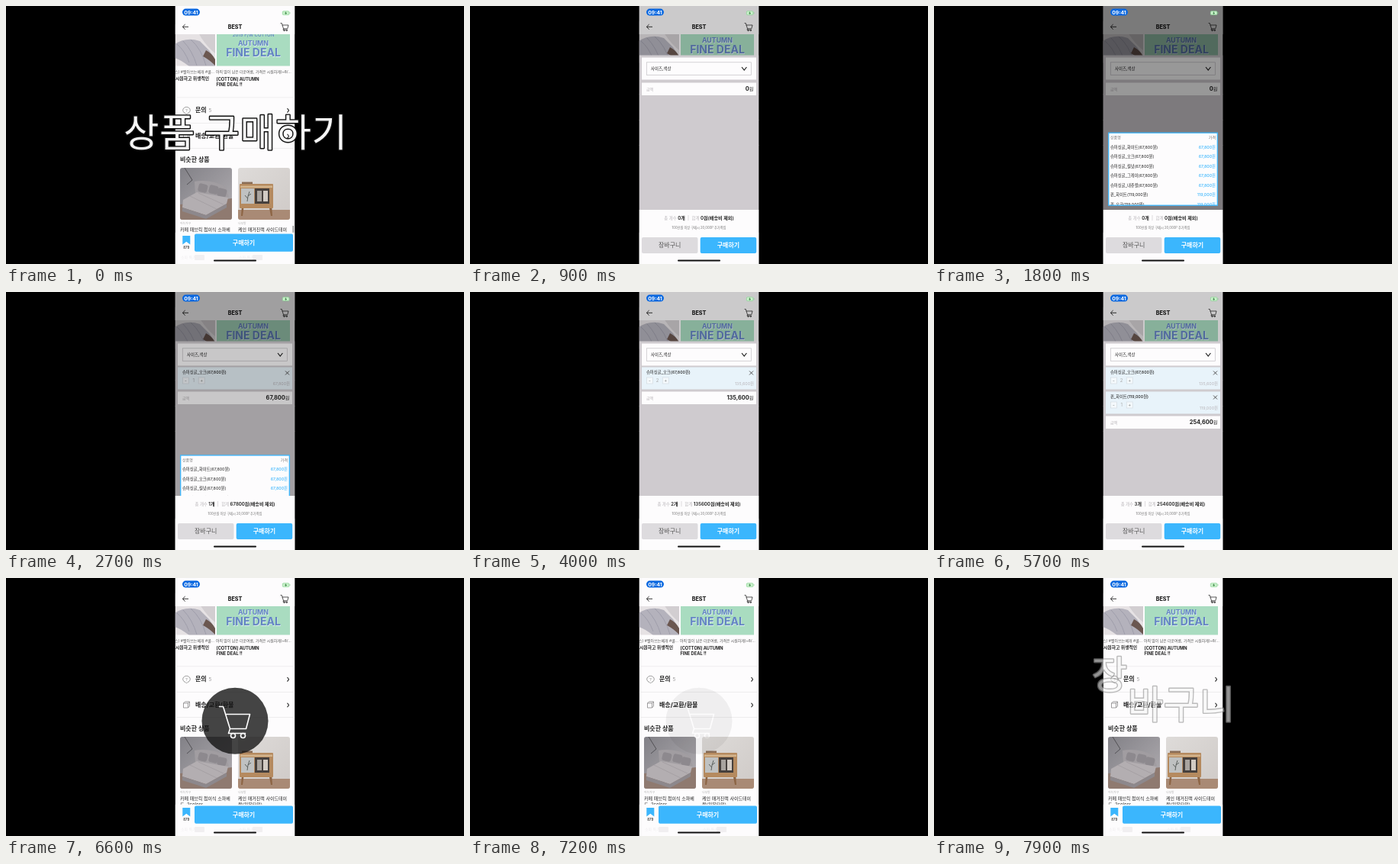
Write an HTML page that moves like this. It is 600 px wide and 338 px high and loops after 8000 ms.

```html
<!DOCTYPE html>
<html lang="ko">
<head>
<meta charset="utf-8">
<title>상품 구매하기</title>
<style>
html, body { margin: 0; width: 100%; height: 100%; overflow: hidden; background: #000; }
svg { display: block; width: 100vw; height: 100vh; }
text { font-family: Inter, "Noto Sans CJK KR", "Noto Sans CJK", "Noto Sans", sans-serif; white-space: pre; }
.title text { font-family: "Noto Sans CJK KR", "Noto Sans CJK", sans-serif; font-size: 50.5px; font-weight: 300; fill: #f6f6f6; stroke-width: 2.8; stroke-linejoin: round; paint-order: stroke; }
</style>
</head>
<body>
<svg id="stage" viewBox="0 0 600 338"></svg>
<script>
const LOOP = 8000, STEP = 100;
const LEFT = 221.6, WIDTH = 156.8;
const BLUE = '#3bb6fd', INK = '#222', PALE = '#b9b6ba', SHADE = '#cfcbcf', PAPER = '#fdfcfd';
const stage = document.getElementById('stage');

// Drawing helpers
const rect = (x, y, w, h, fill, extra = '') =>
  `<rect x="${x}" y="${y}" width="${w}" height="${h}" fill="${fill}" ${extra}/>`;
const band = (y, h, fill, extra) => rect(LEFT, y, WIDTH, h, fill, extra);
const path = (d, stroke, width = 1, extra = '') =>
  `<path d="${d}" fill="none" stroke="${stroke}" stroke-width="${width}" ${extra}/>`;
const shape = (d, fill) => `<path d="${d}" fill="${fill}"/>`;
const text = (x, y, size, str, fill = INK, weight = 400, anchor = 'start') =>
  `<text x="${x}" y="${y}" font-size="${size}" fill="${fill}" font-weight="${weight}" text-anchor="${anchor}">${str}</text>`;
const span = (str, size, fill, weight = 400) =>
  `<tspan font-size="${size}" fill="${fill}" font-weight="${weight}">${str}</tspan>`;
const group = (str, dx = 0, dy = 0, alpha = 1, extra = '', scale = 1) =>
  `<g transform="translate(${dx} ${dy}) scale(${scale})" opacity="${alpha}" ${extra}>${str}</g>`;

// Timing helpers
const ramp = (t, a, b) => {
  const p = Math.min(1, Math.max(0, (t - a) / (b - a)));
  return p * p * (3 - 2 * p);
};
const pulse = (t, a, b, c, d) => ramp(t, a, b) - ramp(t, c, d);
const comma = n => n.toLocaleString('en-US');

const defs = `<defs>
  <clipPath id="phone"><rect x="${LEFT}" width="${WIDTH}" height="338"/></clipPath>
  <clipPath id="pillow"><rect x="${LEFT}" y="20" width="52.4" height="54.5"/></clipPath>
  <clipPath id="card"><rect width="68" height="68" rx="3"/></clipPath>
  <clipPath id="list"><rect x="228" y="165" width="144" height="96"/></clipPath>
  <linearGradient id="wall" x2="1" y2="1"><stop stop-color="#828187"/><stop offset="1" stop-color="#b3afb3"/></linearGradient>
  <linearGradient id="room" x2="1" y2="1"><stop stop-color="#dedbd9"/><stop offset="1" stop-color="#cfcac7"/></linearGradient>
</defs>`;

const cart = (color, width) =>
  path('M0 0H5L14 29H35L40 10H8.5M14 29L12 35H34', color, width, 'stroke-linejoin="round" stroke-linecap="round"') +
  `<g fill="none" stroke="${color}" stroke-width="${width}"><circle cx="18" cy="38" r="3"/><circle cx="31" cy="38" r="3"/></g>`;

function pillowPhoto() {
  return group(
    rect(LEFT, 20, 53, 55, '#e6e2e4') +
    shape('M221 46Q236 36 254 42L266 54 274 66V75H240Q228 66 221 64Z', '#b4b2bc') +
    shape('M246 20H274V58Q264 50 256 38Z', '#d2ced1') +
    shape('M262 54Q270 58 274 66V74Q266 66 258 62Z', '#6b5750') +
    path('M232 42Q244 54 250 74M242 40Q256 52 262 74M224 46Q234 54 240 70', '#9c9ba9', 0.9),
    0, 0, 1, 'clip-path="url(#pillow)"');
}

function sofaPhoto() {
  const cushion = (x, y) => rect(x, y, 12, 11, '#8d898e', `rx="3" transform="rotate(14 ${x + 6} ${y + 5})"`);
  return group(
    rect(0, 0, 68, 68, 'url(#wall)') +
    shape('M0 48L68 40V68H0Z', '#8f7a70') +
    path('M6 0L16 16M16 16L9 22', '#454347', 0.8) +
    shape('M19 18Q40 14 60 25L64 38 56 46 20 34Z', '#a19da1') +
    cushion(24, 21) + cushion(38, 23) + cushion(49, 27) +
    shape('M4 42L22 32 63 39 61 47 34 62 3 52Z', '#b3aeb1') +
    shape('M3 52L34 62 61 47V52L34 67 3 57Z', '#8d888c') +
    path('M13 37L48 54M24 33L57 48', '#9f9a9e', 0.7),
    228, 208, 1, 'clip-path="url(#card)"');
}

function tablePhoto() {
  return group(
    rect(0, 0, 68, 68, 'url(#room)') +
    rect(0, 55, 68, 13, '#a98a75') +
    shape('M5 48L4 63H6L8 48ZM40 48L43 63H45L44 48Z', '#8d6545') +
    rect(2, 21, 44, 32, '#b58a5f', 'rx="1"') +
    rect(3, 23.5, 42, 2.5, '#d3b48d') +
    rect(4, 27, 17, 20, '#bfc1c1') +
    path('M12 44Q12.5 37 15 31M12.5 40L9 36M13 37L17 34', '#5d625f', 1) +
    rect(22, 27, 19, 20, '#46403d') +
    rect(25, 30, 6, 14, '#a9a49f') + rect(33, 30, 6, 14, '#d2cbc4') +
    rect(5, 18.5, 14, 2.5, '#8a6d56'),
    304, 208, 1, 'clip-path="url(#card)"');
}

function banner() {
  const relief = (y, size, str) =>
    text(324.6, y + 0.7, size, str, '#dceff0', 700, 'middle') + text(324, y, size, str, '#6484c4', 700, 'middle');
  return rect(276, 20, 96, 54.5, '#a9dcc0') +
    text(324, 36, 6, '2019 F/W COTTON', '#5f7fc6', 500, 'middle') +
    relief(48.3, 8.8, 'AUTUMN') + relief(62.3, 14, 'FINE DEAL');
}

function menuRow(y, label, count = '') {
  return text(248, y + 3, 8, label, INK, 700) + text(265.5, y + 2.8, 6.5, count, '#999') +
    path(`M368.5 ${y - 2.3}L370.5 ${y + 0.5}L368.5 ${y + 3.3}`, INK, 1.1);
}

function content() {
  const line = y => band(y, 0.7, '#e9e7e9');
  return pillowPhoto() + banner() +
    text(221, 83.8, 5, '스) #빨아쓰는베개 #쿨…', '#555') +
    text(275, 83.8, 4.9, '아직 많이 남은 더운여름, 가격은 시원하게(~8/…', '#555') +
    text(222, 92.6, 5.8, '시원하고 위생적인', INK, 600) +
    text(275.5, 93.5, 5.7, '[COTTON] AUTUMN', INK, 700) +
    text(275.5, 101, 5.7, 'FINE DEAL !!', INK, 700) +
    line(115.5) + line(149) + line(182) +
    menuRow(132.3, '문의', '5') + menuRow(166, '배송/교환/환불') +
    path('M235 136.5A4.8 4.2 0 1 1 238 136.5L236.5 138Z', '#777', 0.7) +
    text(236.5, 134.5, 5, '?', '#777', 400, 'middle') +
    path('M232.5 164H238.5V170H232.5ZM232.5 164L234.5 162H240.5L238.5 164M240.5 162V168L238.5 170', '#777', 0.7) +
    text(228, 200, 8, '비슷한 상품', INK, 700) +
    sofaPhoto() + tablePhoto() +
    text(228, 281.5, 3.8, '아늑가구', '#aaa') + text(304, 281.5, 3.8, '나무방', '#aaa') +
    text(228, 291, 6, '카페 패브릭 접이식 소파베') + text(228, 298.6, 6, '드, 2colors') +
    text(304, 291, 6, '케인 매거진랙 사이드테이') + text(304, 298.6, 6, '블(원목타입)');
}

function page(t) {
  const drift = 4.5 * (1 - ramp(t, -100, 400));
  const faint = x => text(x, 331, 5, '소파 특가', '#efedef') + rect(x + 18, 326, 13, 7, '#f1eff1', 'rx="1"');
  return band(0, 338, PAPER) + group(content(), 0, drift) +
    (drift > 1 ? rect(375.6, 288, 1.2, 9, '#777') : '') +
    band(0, 37, PAPER) +
    path('M239 27.3H231.5M234.7 24L231.3 27.3L234.7 30.6', INK, 0.9) +
    text(300, 30, 7.2, 'BEST', INK, 800, 'middle') +
    group(cart(INK, 3), 360, 22.5, 1, '', 0.25) +
    band(296.8, 41.2, PAPER) + faint(229) + faint(305) +
    shape('M231.3 301H241.3V312.4L236.3 308.8L231.3 312.4Z', BLUE) +
    text(236.3, 318.3, 4.5, '879', INK, 500, 'middle') +
    rect(247, 298.5, 129, 23.3, BLUE, 'rx="2"') +
    text(311.5, 313, 8, '구매하기', '#fff', 700, 'middle');
}

function optionCard(item, i) {
  const y = 98.5 + 32 * i;
  const box = (x, sign) => rect(x, y + 13.5, 8, 8, '#f4f9fc', 'stroke="#cfd8dd" stroke-width=".6"') +
    text(x + 4, y + 19.5, 6, sign, '#888', 400, 'middle');
  return rect(225, y, 150, 29, '#e8f3fa') +
    text(231, y + 8.6, 5.3, `${item.name}(${comma(item.price)}원)`, INK, 500) +
    path(`M366 ${y + 5}l5 5m0 -5l-5 5`, '#555', 1) +
    box(231.5, '-') + text(245.7, y + 19.6, 6, item.count, '#aaa', 400, 'middle') + box(252.2, '+') +
    text(372, y + 23, 5.4, comma(item.price * item.count) + '원', PALE, 400, 'end');
}

const sizes = [['슈퍼싱글', 67800], ['퀸', 119000]];
const colors = ['화이트', '오크', '월넛', '그레이', '내츄럴'];
const options = sizes.flatMap(([size, price]) => colors.map(c => ({ name: `${size}_${c}`, price }))).slice(0, 7);

function picker() {
  const rows = options.map((o, i) => {
    const y = 186.6 + 12.5 * i;
    return text(231, y, 5.3, `${o.name}(${comma(o.price)}원)`, INK) +
      text(369, y, 5.3, comma(o.price) + '원', BLUE, 500, 'end');
  }).join('');
  return rect(228.7, 166.2, 142.6, 95, PAPER) +
    group(text(231, 174, 5, '상품명', '#777') + text(369, 174, 5, '가격', '#777', 400, 'end') + rows,
      0, 0, 1, 'clip-path="url(#list)"') +
    rect(228.7, 166.2, 142.6, 95, 'none', `stroke="${BLUE}" stroke-width="1.3"`);
}

function itemsAt(t) {
  const items = [];
  if (t >= 2500) items.push({ ...options[1], count: t < 3300 ? 1 : 2 });
  if (t >= 5200) items.push({ ...options[5], count: 1 });
  return items;
}

function summary(count, total) {
  return band(267, 71, PAPER) +
    `<text x="300" y="280.2" text-anchor="middle">` +
    span('총 개수 ', 5.4, PALE) + span(count + '개', 6, INK, 600) + span('  |  ', 6, PALE) +
    span('합계 ', 5.4, PALE) + span(total + '원(배송비 제외)', 6.1, INK, 600) + '</text>' +
    text(300, 292.2, 4.2, '100만원 이상 구매시 20,000P 추가적립', '#777', 400, 'middle') +
    rect(225, 303, 73.5, 21, '#dddbde', 'rx="2"') + text(261.7, 316.4, 8, '장바구니', '#555', 400, 'middle') +
    rect(301.7, 303, 73.5, 21, BLUE, 'rx="2"') + text(338.4, 316.4, 8, '구매하기', '#fff', 700, 'middle');
}

function sheet(t) {
  const open = pulse(t, 550, 850, 6300, 6500);
  if (open <= 0) return '';
  const pick = pulse(t, 1400, 1700, 2500, 2915) + pulse(t, 4500, 4800, 5150, 5500);
  const items = itemsAt(t);
  const count = items.reduce((n, i) => n + i.count, 0);
  const total = items.reduce((n, i) => n + i.count * i.price, 0);
  const top = items.length ? 98.5 + 32 * items.length : 100.5;
  const slide = 274 * (1 - open);
  const body =
    band(64.5, 274, SHADE) +
    rect(225, 67.5, 150, 29, PAPER) +
    rect(231.3, 73.8, 137, 16.5, PAPER, 'stroke="#c4c1c5" stroke-width=".7"') +
    text(237, 84, 5.4, '사이즈,색상', INK, 500) +
    path('M356 80L359.2 84L362.4 80', INK, 1.2) +
    items.map(optionCard).join('') +
    rect(225, top, 150, 16.5, PAPER) + text(231, top + 10, 5, '금액', PALE) +
    `<text x="371.5" y="${top + 10.8}" text-anchor="end">` +
    span(comma(total), 7.4, INK, 700) + span('원', 6.2, INK, 500) + '</text>';
  const dim = pick > 0 ? band(0, 267, '#000', `opacity="${0.4 * pick}"`) : '';
  return band(0, 338, '#000', `opacity="${0.2 * open}"`) +
    group(body, 0, slide) + dim +
    (pick > 0 ? group(picker(), 0, 101 * (1 - pick)) : '') +
    group(summary(count, total), 0, slide);
}

function toast(t) {
  const alpha = pulse(t, 6400, 6600, 6950, 7250);
  return alpha <= 0 ? '' : group(
    '<circle cx="300" cy="187.3" r="43.5" fill="#111" opacity=".78"/>' +
    group(cart('#fff', 1.6), 279.5, 168.5), 0, 0, alpha);
}

function system() {
  return rect(231, 3.6, 23, 9, '#0a68e0', 'rx="4.5"') +
    text(242.5, 10.6, 6.8, '09:41', '#fff', 700, 'middle') +
    rect(362.3, 6.8, 8.6, 4.8, '#c9f0cb', 'rx="1.2" stroke="#7fcf88" stroke-width=".6"') +
    rect(371.6, 8.2, 0.7, 2, '#7fcf88') +
    shape('M367 7L365 9.7H366.5L366 11.6L368.2 8.9H366.7Z', '#2f7a38') +
    rect(272, 332.6, 56, 2, '#111', 'rx="1"');
}

// Letters are placed one by one so each can move alone.
function title(str, alpha, outline, lift = () => 0) {
  if (alpha <= 0) return '';
  const widths = [...str].map(c => c === ' ' ? 11.5 : 47);
  let x = 300.8 - widths.reduce((a, b) => a + b) / 2;
  const letters = [...str].map((c, i) => {
    const out = `<text x="${x}" y="${184 + lift(i)}">${c}</text>`;
    x += widths[i];
    return out;
  }).join('');
  return group(letters, 0, 0, alpha, `class="title" stroke="${outline}"`);
}

function draw(t) {
  const enter = ramp(t, 7600, 7900);
  stage.innerHTML = defs +
    group(page(t) + sheet(t) + toast(t) + system(), 0, 0, 1, 'clip-path="url(#phone)"') +
    title('상품 구매하기', 1 - ramp(t, 0, 400), '#111') +
    title('장바구니', 0.6 * enter, '#909090', i => i ? 0 : -39 * enter);
}

const start = performance.now();
let last = -1;
function tick() {
  const t = Math.floor((performance.now() - start) % LOOP / STEP) * STEP;
  if (t !== last) draw(last = t);
  requestAnimationFrame(tick);
}
tick();
</script>
</body>
</html>
```
